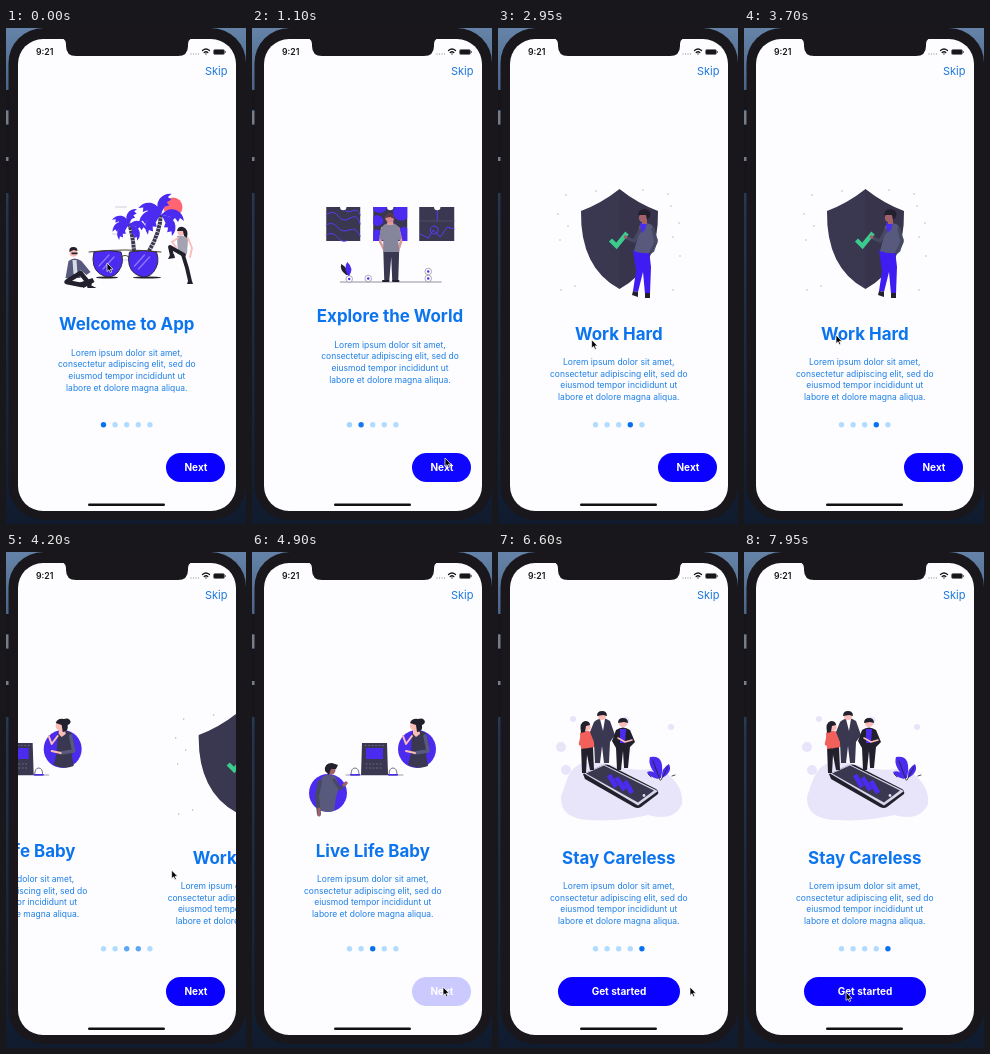
Write an HTML page that moves like this. It is 240 px wide and 496 px high and loops after 8000 ms.

```html
<!DOCTYPE html>
<html lang="en">
<head>
<meta charset="utf-8">
<title>Onboarding</title>
<style>
html, body { margin: 0; width: 100%; height: 100%; overflow: hidden; background: #101a2c; }
svg { display: block; width: 240px; height: 496px; font-family: Inter, sans-serif; }
.title { font-size: 16.9px; font-weight: 700; fill: #0b74ee; text-anchor: middle; }
.body { font-size: 8.5px; fill: #1e7fe6; text-anchor: middle; }
.label { font-size: 10px; font-weight: 700; fill: #fff; text-anchor: middle; }
.p { fill: #4b2bf0; }
.d { fill: #3a3750; }
.k { fill: #22202c; }
.s { fill: #fbbcb8; }
.b { fill: #a0616a; }
.g { fill: #575a7c; }
.l { fill: none; stroke-linecap: round; stroke-linejoin: round; }
.butt { stroke-linecap: butt; stroke-linejoin: miter; }
</style>
</head>
<body>
<svg viewBox="0 0 240 496">
  <defs>
    <linearGradient id="wall" x2="0" y2="1">
      <stop stop-color="#6583a8"/><stop offset=".13" stop-color="#4a6488"/>
      <stop offset=".36" stop-color="#24364f"/><stop offset="1" stop-color="#101b2e"/>
    </linearGradient>
    <clipPath id="screen"><rect x="12" y="11" width="218" height="472" rx="25"/></clipPath>
    <path id="leaf" d="M0 0Q7-8 15-5Q22-2 23 6L19 3L17 7L14 3L11 6L9 2Q4 0 0 0"/>
    <g id="palm">
      <use href="#leaf"/><use href="#leaf" transform="rotate(48)"/><use href="#leaf" transform="rotate(-78)"/>
      <g transform="scale(-1 1)">
        <use href="#leaf" transform="rotate(-32)"/><use href="#leaf" transform="rotate(8)"/><use href="#leaf" transform="rotate(42)"/>
      </g>
    </g>
    <g id="lens">
      <path class="p" d="M1 1Q15-2 28 1Q32 12 25 21Q19 28 11 25Q0 21 0 8Z" stroke="#302a3c"/>
      <path class="l" d="M6 15L16 4M10 18L21 6" stroke="#8d78f8" stroke-width="1.3"/>
    </g>
    <g id="lamp">
      <path d="M-4 4Q-4-3 0-3Q4-3 4 4Z" fill="#fff" stroke="#3a3750" stroke-width=".7"/>
      <path class="p" d="M-5 3h10v1.5h-10z"/>
    </g>
    <g id="ring">
      <circle r="3.3" fill="#fff" stroke="#77758a" stroke-width=".6"/><circle class="p" r="1.2"/>
    </g>
  </defs>

  <rect width="240" height="496" fill="url(#wall)"/>
  <path d="M0 62h3v20H0zM0 97h3v32H0zM0 133h3v32H0z" fill="#17151b"/>
  <path d="M0 83h3v13H0zM0 129h3v4H0z" fill="#777d86"/>
  <rect x="2.500" y="0" width="237.500" height="492" rx="35" fill="#19171b"/>

  <g clip-path="url(#screen)">
    <rect x="12" y="11" width="218" height="472" fill="#fdfdff"/>
    <g id="pages">
      <g>
        <path class="l" d="M110 179h10M107 206h9M112 232h9" stroke="#e6e6ec" stroke-width="2.2"/>
        <circle cx="167" cy="179" r="9.500" fill="#ff6672"/>
        <path class="l butt" d="M155 186Q154 205 143 223M123 195Q127 208 128 223" stroke="#3a3750" stroke-width="4"/>
        <path class="l butt" d="M155 186Q154 205 143 223M123 195Q127 208 128 223" stroke="#fff" stroke-width="4" stroke-dasharray=".6 3"/>
        <use href="#palm" class="p" transform="translate(155 187)"/>
        <use href="#palm" class="p" transform="translate(123 197)scale(.75)"/>
        <ellipse class="k" cx="101" cy="249.500" rx="11" ry="1"/><ellipse class="k" cx="141" cy="249.500" rx="14" ry="1"/>
        <use href="#lens" x="87" y="223"/><use href="#lens" x="122.500" y="223"/>
        <path class="l" d="M83 224Q119 220 155 224M115 229Q119 226 123 229" stroke="#4a4038" stroke-width="1.1"/>
        <g transform="translate(1.500 -1)">
          <path class="g" d="M61 234Q67 229 74 234L83 245L79 248L73 243V251H58Z"/>
          <path d="M65 233h4l1 14h-4z" fill="#d9dae6"/>
          <path class="l" d="M60 254L73 246L82 257M59 255L74 258" stroke="#22202c" stroke-width="4.500"/>
          <path class="k" d="M79 256L89 261H80ZM71 256L85 251L87 255L76 261Z"/>
          <circle class="s" cx="66" cy="226" r="3.800"/>
          <path class="k" d="M62 225Q61 220 66 220Q70 220 70 224L66 223ZM64 225.500h6v1.700h-6z"/>
        </g>
        <path d="M171 208Q177 206 182 211L181 226H172Z" fill="#a4a3b2"/>
        <path class="l" d="M172 210L166 214L170 219M182 210L186 220L184 229" stroke="#fbbcb8" stroke-width="1.800"/>
        <path class="l" d="M178 227L164 219L166 228" stroke="#22202c" stroke-width="3.800"/>
        <path class="l" d="M177 227L181 240L184 253" stroke="#22202c" stroke-width="3.800"/>
        <path class="k" d="M164 227L168 226L169 230L162 231ZM182 253h4l1 3h-6z"/>
        <circle class="s" cx="175" cy="204" r="3.500"/>
        <path class="k" d="M171 203Q172 198 177 199Q183 201 181 210L178 208L177 203Z"/>
      </g>
      <g>
        <g transform="translate(-17)">
          <path class="d" d="M74 179h34v34H74zM121 179h34v34h-34zM167 179h35v34h-35z"/>
          <path class="l" d="M74 187Q81 181 86 188T98 190T108 196M74 197Q80 193 85 199T97 202T108 208M74 207Q80 203 85 209T94 213M90 179Q94 186 100 183T108 187" stroke="#5a3cf4"/>
          <path class="p" d="M121 182a8 8 0 0 0 14-3h-14zM121 189a6 6 0 0 1 10 5a6 6 0 0 1-10 2zM143 179h12v11a8 8 0 0 1-12-11M121 203a6 6 0 0 1 8 10h-8zM155 200a7 7 0 0 0-7 13h7z"/>
          <path class="l" d="M185 179v14M168 206L176 210L181 202L188 209L195 199L202 201M178 202a4 4 0 1 0 8 0a4 4 0 1 0-8 0" stroke="#5a3cf4"/>
          <path class="l" d="M168 193h34" stroke="#565269" stroke-width=".8"/>
          <g fill="#fff"><circle cx="91" cy="179" r="3.2"/><circle cx="138" cy="179" r="3.2"/><circle cx="185" cy="179" r="3.2"/></g>
          <path class="l" d="M88 254H189" stroke="#77758a" stroke-width=".8"/>
          <path class="k" d="M94 247Q87 242 89 236Q96 240 96 247Z"/>
          <path class="p" d="M96 248Q91 240 95 234Q102 240 97 248Z"/>
          <use href="#ring" x="97" y="251"/><use href="#ring" x="116" y="250.5"/>
          <use href="#ring" x="176" y="243.5"/><use href="#ring" x="176" y="250.5"/>
          <path class="d" d="M131 220H147L146 253H140L139 229L137 253H132Z"/>
          <path class="k" d="M130 252h7v2h-7zM140 252h7v2h-7z"/>
          <path class="l" d="M130 200L128 214L132 222M146 200L149 213L146 222" stroke="#d99a9a" stroke-width="2.6"/>
          <path d="M133 196Q138 194 143 196Q148 198 149 211L146 212L147 224H131L131 212L127 211Q128 198 133 196Z" fill="#85859c"/>
          <path d="M135 190h6v7h-6z" fill="#e39b9b"/>
          <circle cx="137.500" cy="190" r="4.400" fill="#d58a8d"/>
          <path d="M133 190Q133 185 138 185Q142 186 142 191L138 189Z" fill="#5b3a48"/>
        </g>
      </g>
      <g>
        <circle class="p" cx="76" cy="241" r="19"/><circle class="p" cx="165" cy="197" r="19"/>
        <path class="l" d="M94 223H151" stroke="#85839a" stroke-width=".8"/>
        <path class="d" d="M110 191h25l1 32h-27z"/>
        <path class="p" d="M114 196h17v11h-17z"/>
        <path class="l" d="M113 193.500h19M114 212h17M114 216h17" stroke="#6b6785" stroke-dasharray="1 2.500"/>
        <use href="#lamp" x="103" y="219"/><use href="#lamp" x="141" y="219"/>
        <path class="g" d="M70 225Q77 220 84 225L87 235L84 245L82 259Q74 261 66 258L65 238Z"/>
        <path class="l" d="M82 228L88 237L94 231" stroke="#474963" stroke-width="3"/>
        <path class="l" d="M68 230L65 244L67 262" stroke="#474963" stroke-width="4"/>
        <path class="l" d="M67 257v6M92 233l2-2" stroke="#a0616a" stroke-width="3"/>
        <circle class="b" cx="79" cy="218" r="4.500"/>
        <path class="k" d="M73 219Q72 211 80 211L86 213L84 217L79 217L77 223Z"/>
        <path class="d" d="M160 181Q167 177 174 181L177 193L174 203L176 214Q166 218 156 213L159 201Z"/>
        <path class="l" d="M173 184L176 199L163 201" stroke="#575a7c" stroke-width="3.500"/>
        <path class="l" d="M160 184L154 192L151 184M163 201L154 199" stroke="#fbbcb8" stroke-width="2"/>
        <path class="s" d="M161 176h6l1 6l-4 3l-3-3z"/><circle class="s" cx="162" cy="174" r="4"/>
        <path class="k" d="M158 171Q160 166 166 167Q172 165 173 170Q172 173 170 173Q171 180 165 180L164 173Z"/>
      </g>
      <g>
        <path class="d" d="M121.500 161Q139 175 160 183Q161 240 121.500 261Q82 240 83 183Q104 175 121.500 161Z"/>
        <path d="M121.500 161Q139 175 160 183Q161 240 121.500 261Z" opacity=".06"/>
        <path class="l" d="M68 167h0M98 163h0M145 162h0M173 178h0M60 186h0M70 198h0M181 195h0M175 209h0M62 212h0M182 228h0M63 262h0M77 258h0M175 262h0M170 166h0" stroke="#d9a0b0" stroke-width="1.500"/>
        <path class="l butt" d="M112.500 212L118.500 218L129 205" stroke="#3acb8d" stroke-width="4.500"/>
        <path d="M135 222H151L153 239L152 266H147L145 244L140 264L135 263L138 243Z" fill="#3f1df2"/>
        <path class="k" d="M135 263l5 1v5l-6-2zM147 265h5v5h-5z"/>
        <path class="g" d="M141 198Q148 193 154 197L160 212L156 224Q146 227 136 223L139 212Z"/>
        <path class="p" d="M142 195l7-1l-2 8l-4 3z"/>
        <path class="l" d="M142 202L136 213L129 210" stroke="#474963" stroke-width="3.300"/>
        <path class="l" d="M155 201L158 214L153 224" stroke="#474963" stroke-width="3.300"/>
        <circle class="b" cx="127.500" cy="209" r="1.800"/>
        <path class="b" d="M144 191h5v5h-5z"/><circle class="b" cx="145" cy="190" r="4.200"/>
        <path class="k" d="M140 187Q140 181 147 181Q154 182 152 189L149 192L148 187Z"/>
      </g>
      <g>
        <path d="M70 225Q80 203 110 212T160 216Q186 230 184 252Q176 270 150 263Q122 270 92 268Q62 267 63 245Q66 235 70 225Z" fill="#e8e4f9"/>
        <g fill="#e8e4f9">
          <circle cx="63" cy="195" r="5"/><circle cx="68" cy="218" r="5"/><circle cx="75" cy="167" r="3"/>
          <circle cx="173" cy="175" r="3"/><circle cx="127" cy="169" r="4.500"/>
        </g>
        <path class="k" d="M85 222L105 213Q108 212 111 213L158 237Q161 239 160 242L143 255Q140 257 136 255L87 227Z"/>
        <path d="M86 221.500L106 212.500L160 239L140 253.500Z" fill="#d9d8ea"/>
        <path class="d" d="M88 221.500L106 213.500L156 238.500L140 250.500Z"/>
        <circle cx="146" cy="243.500" r="1.400" fill="#d9d8ea"/>
        <path class="l butt" d="M111 223l7 12M118.500 225.500l8 12.500M127 229l7 12" stroke="#4b2bf0" stroke-width="4.800"/>
        <path class="k" d="M83 194h12l1 24h-4l-3-15l-1 18h-4z"/>
        <path d="M82 181Q89 176 96 182L97 195L83 197Z" fill="#f2605c"/>
        <path class="l" d="M84 183L82 192L89 195" stroke="#f2605c" stroke-width="2.600"/>
        <circle class="s" cx="89" cy="175" r="3.800"/>
        <path class="k" d="M83 181Q81 170 87 169Q92 169 92 173L88 174L87 180Z"/>
        <path class="d" d="M96 170Q104 163 112 169L117 183L112 190L111 211H106L104 194L102 211H97L96 190L92 180Z"/>
        <path d="M102 167h5l-2 12z" fill="#fff"/>
        <circle class="s" cx="104" cy="164" r="4"/>
        <path class="k" d="M99 164Q99 159 104 159Q109 159 109 164L105 163Z"/>
        <path class="k" d="M118 178Q125 173 132 178L137 190L132 195L130 216H126L125 199L123 218H119L118 196L114 189Z"/>
        <path class="p" d="M122 177h6l-1 14h-5z"/>
        <path class="l" d="M120 186L127 190L134 188" stroke="#fbbcb8" stroke-width="1.600"/>
        <circle class="s" cx="125" cy="171" r="4"/>
        <path class="k" d="M120 171Q120 166 125 166Q130 166 130 171L126 170Z"/>
        <path class="p" d="M161 226Q149 214 152 205Q168 202 163 226ZM164 226Q163 216 171 212Q175 220 164 226ZM160 227Q151 225 149 220Q156 217 161 226Z"/>
        <path class="l" d="M155 209L162 228M170 215L163 228M150 222L153 225M174 224L177 223" stroke="#22202c" stroke-width=".8"/>
      </g>
    </g>
    <g id="dots"></g>
    <g id="next">
      <rect x="160" y="425" width="59" height="29" rx="14.500" fill="#0900ff"/>
      <text class="label" x="190" y="443">Next</text>
    </g>
    <g id="start">
      <rect x="60" y="425" width="122" height="29" rx="14.500" fill="#0900ff"/>
      <text class="label" x="121" y="443">Get started</text>
    </g>
    <text x="199" y="47" font-size="11" fill="#1c78dd">Skip</text>
    <path d="M55 10Q60 11 60 16V18Q60 28 70 28H172Q182 28 182 18V16Q182 11 187 10Z" fill="#19171b"/>
    <text x="30" y="27" font-size="8.700" font-weight="600" fill="#17171b">9:21</text>
    <path class="l" d="M185 26h8" stroke="#a5a5aa" stroke-width="1.300" stroke-dasharray="0 2.500"/>
    <path class="l" d="M196.500 22.500Q200 19.500 203.500 22.500M198.200 24.500Q200 23 201.800 24.500M200 26h0" stroke="#17171b" stroke-width="1.300"/>
    <rect x="207.500" y="21.500" width="11" height="5" rx="1.500" fill="#17171b" stroke="#77777c" stroke-width=".7"/>
    <path d="M219.500 23v2" stroke="#77777c"/>
    <rect x="82" y="475.500" width="77" height="2.500" rx="1.200" fill="#111"/>
  </g>
  <path id="cursor" d="M0 0V8.500L2 6.700L3.300 9.700L4.700 9.100L3.400 6.200H6Z" fill="#000" stroke="#fff" stroke-width=".7"/>
</svg>
<script>
const $ = id => document.getElementById(id);
const PAGE_WIDTH = 218;
const pages = [["Welcome to App", 302], ["Explore the World", 294], ["Live Life Baby", 304.5],
  ["Work Hard", 311.5], ["Stay Careless", 311.5]];
const lines = ["Lorem ipsum dolor sit amet,", "consectetur adipiscing elit, sed do",
  "eiusmod tempor incididunt ut", "labore et dolore magna aliqua."];
// [start, duration, page change]
const slides = [[880, 270, 1], [1600, 270, 1], [2168, 600, 1], [3950, 500, -1], [4950, 270, 1], [5793, 270, 1]];
// [down, up]
const presses = [[720, 860], [1500, 1600], [4800, 4950], [5640, 5790]];
// [time, x, y]
const cursorPath = [[0, 101, 235], [150, 101, 235], [650, 193, 430], [1800, 193, 430], [2150, 181, 400],
  [2200, 180, 400], [2600, 100, 330], [3100, 92, 307], [3900, 92, 307], [4300, 178, 320], [4700, 191, 435],
  [5950, 192, 435], [6900, 192, 435], [7700, 112, 438], [7950, 102, 440]];

const ramp = (t, start, length) => Math.min(1, Math.max(0, (t - start) / length));
const ease = u => (1 - Math.cos(Math.PI * u)) / 2;
const text = (cls, y, s) => `<text class="${cls}" x="120.8" y="${y}">${s}</text>`;

[...$("pages").children].forEach((page, i) => {
  const [title, y] = pages[i];
  page.innerHTML += text("title", y, title) + lines.map((s, n) => text("body", y + 25.5 + n * 11.7, s)).join("");
  const place = document.createElementNS("http://www.w3.org/2000/svg", "g");
  place.setAttribute("transform", `translate(${i * PAGE_WIDTH})`);
  page.replaceWith(place);
  place.append(page);
});
$("dots").innerHTML = pages.map((_, i) => `<circle cx="${97.5 + i * 11.6}" cy="396.7" r="2.7"/>`).join("");

function cursorAt(t) {
  const next = cursorPath.findIndex(k => k[0] > t);
  if (next < 0) return cursorPath.at(-1).slice(1);
  const [a, b] = [cursorPath[next - 1], cursorPath[next]];
  const u = ease(ramp(t, a[0], b[0] - a[0]));
  return [1, 2].map(i => a[i] + (b[i] - a[i]) * u);
}

// The label fades on top of its button's own fade.
function fadeButton(id, shown, touch) {
  $(id).setAttribute("opacity", shown * touch);
  $(id).lastElementChild.setAttribute("opacity", shown);
}

function draw(t) {
  if (t >= 850 && t < 1000) t = 850;
  const position = slides.reduce((sum, [start, length, step]) => sum + step * ease(ramp(t, start, length)), 0);
  $("pages").setAttribute("transform", `translate(${-position * PAGE_WIDTH})`);
  [...$("dots").children].forEach((dot, i) => {
    const on = Math.max(0, 1 - Math.abs(position - i));
    dot.setAttribute("fill", `rgb(${178 - 170 * on},${220 - 106 * on},${255 - 17 * on})`);
  });
  const touch = presses.reduce((o, [down, up]) => o - .8 * (ramp(t, down, 60) - ramp(t, up, 250)), 1);
  const swap = ramp(t, 5870, 280);
  fadeButton("next", 1 - swap, touch);
  fadeButton("start", swap, 1);
  $("cursor").setAttribute("transform", `translate(${cursorAt(t)})`);
}

function frame() {
  draw(performance.now() % 8000);
  requestAnimationFrame(frame);
}
frame();
</script>
</body>
</html>
```
